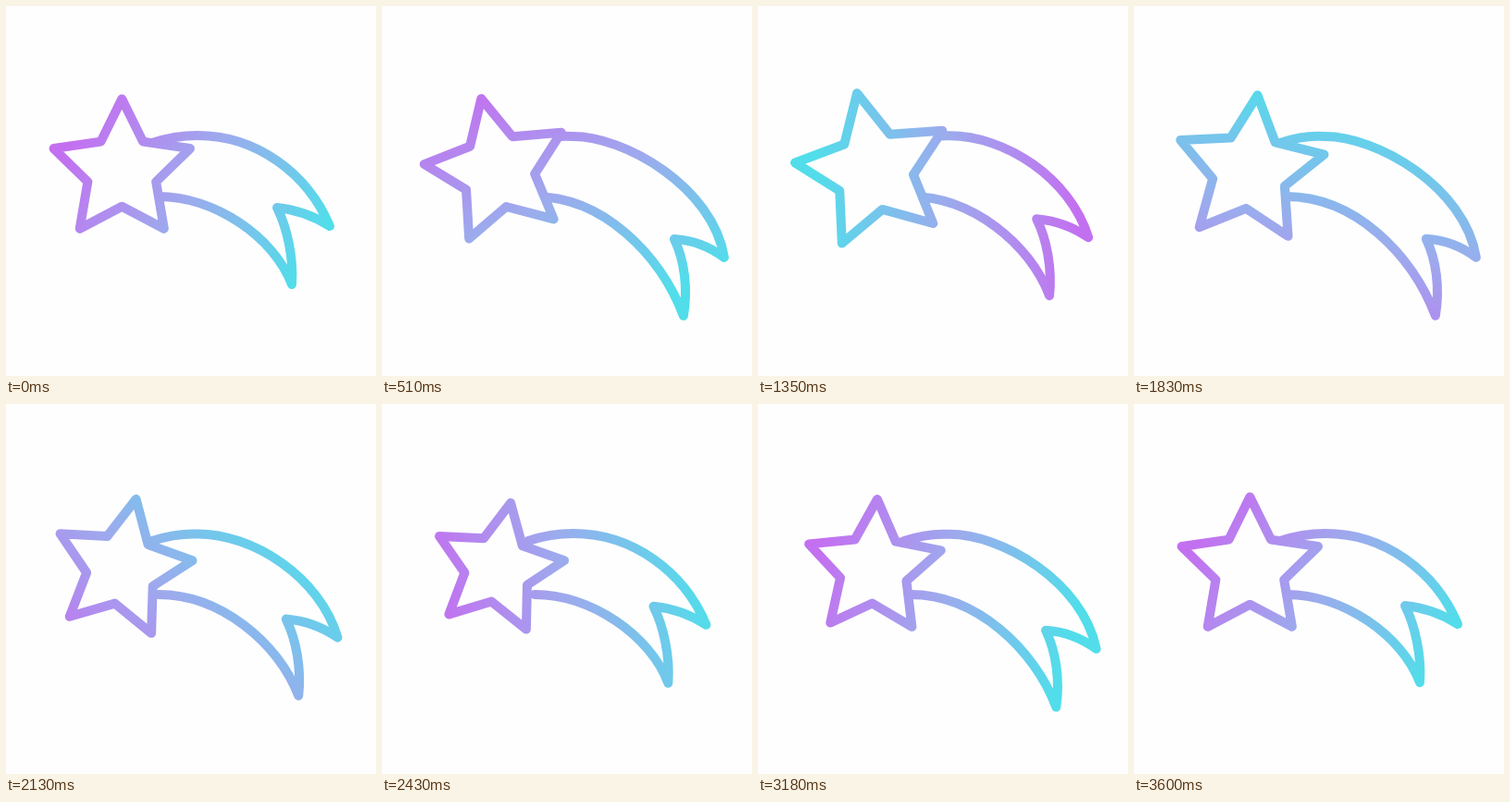
Write an HTML page that moves like this. It is 400 px wide and 400 px high and loops after 5.63 s.

```html
<!DOCTYPE html>
<html lang="en">
<head>
<meta charset="utf-8">
<title>Shooting star</title>
<style>
  html, body { margin: 0; width: 100%; height: 100%; overflow: hidden; background: #fefefe; }
  svg { display: block; width: 100%; height: 100%; }
  path { stroke: url(#ink); stroke-width: 10; stroke-linecap: round; stroke-linejoin: round; }
</style>
</head>
<body>
<svg viewBox="0 0 400 400">
  <defs>
    <linearGradient id="ink" gradientUnits="userSpaceOnUse">
      <stop offset="0" stop-color="#c370f0"/>
      <stop offset="0.5" stop-color="#9cabed"/>
      <stop offset="1" stop-color="#52ddea"/>
    </linearGradient>
  </defs>
  <path id="tail" fill="none"/>
  <path id="star" fill="#fefefe"/>
</svg>
<script>
const LOOP = 5630, MOVE = 3600, STEP = 30, SWAY = 1200;
const $ = id => document.getElementById(id);
const ink = $('ink'), tail = $('tail'), star = $('star');

const linear = u => u;
const smooth = u => u * u * (3 - 2 * u);
const rad = deg => deg * Math.PI / 180;

// Blend between [time, value] poses.
const tween = (ease, ...poses) => t => {
  const i = Math.max(1, poses.findIndex(p => t <= p[0]));
  const [t0, v0] = poses[i - 1], [t1, v1] = poses[i];
  return v0 + (v1 - v0) * ease((t - t0) / (t1 - t0));
};

const turn = tween(smooth, [0, 0], [780, -18], [1040, -18], [2140, 11.5], [2300, 11.3], [MOVE, 0]);
const size = tween(smooth, [0, 1], [1430, 1.107], [2620, 0.921], [MOVE, 1]);
const hue = tween(linear, [0, 30], [510, 65], [1350, 180], [1830, 283], [2430, 348], [MOVE, 390]);

// Quick stretch, softer return.
function sway(t) {
  const v = 2 * (t % SWAY) / SWAY;
  return smooth(v < 1 ? 1 - (1 - v) ** 1.8 : 2 - v);
}

function tailPath(k) {
  const p = (x, y, dx = 0, dy = 0) => `${x + dx * k} ${y + dy * k} `;
  return 'M' + p(158, 148)
    + 'C' + p(173, 143) + p(190, 140) + p(207, 140, -2, 1)
    + p(271, 140, -9) + p(326, 181, 32, 15) + p(350, 238, 20, 34)
    + p(333, 227, 21, 33) + p(313, 220, 22, 33) + p(293, 218, 23, 34)
    + p(304, 240, 23, 35) + p(311, 272, 20, 33) + p(309, 301, 17, 34)
    + p(290, 250, 11, 19) + p(226, 206, 13) + p(165, 206);
}

function starPath(deg, scale) {
  const pts = Array.from({ length: 10 }, (_, i) => {
    const a = rad(deg + i * 36 - 90), r = scale * (i % 2 ? 38.8 : 77.5);
    return `${125.3 + r * Math.cos(a)} ${178 + r * Math.sin(a)}`;
  });
  return `M${pts.join('L')}Z`;
}

function draw(t) {
  const a = rad(hue(t)), dx = 142 * Math.cos(a), dy = 142 * Math.sin(a);
  const cx = 203, cy = 200 + 45 * Math.max(0, -Math.sin(a));
  const ends = { x1: cx - dx, y1: cy - dy, x2: cx + dx, y2: cy + dy };
  for (const key in ends) ink.setAttribute(key, ends[key]);
  tail.setAttribute('d', tailPath(sway(t)));
  star.setAttribute('d', starPath(turn(t), size(t)));
}

const start = performance.now();
function tick() {
  const t = (performance.now() - start) % LOOP;
  draw(Math.min(MOVE, Math.floor(t / STEP) * STEP));
  requestAnimationFrame(tick);
}
tick();
</script>
</body>
</html>
```
